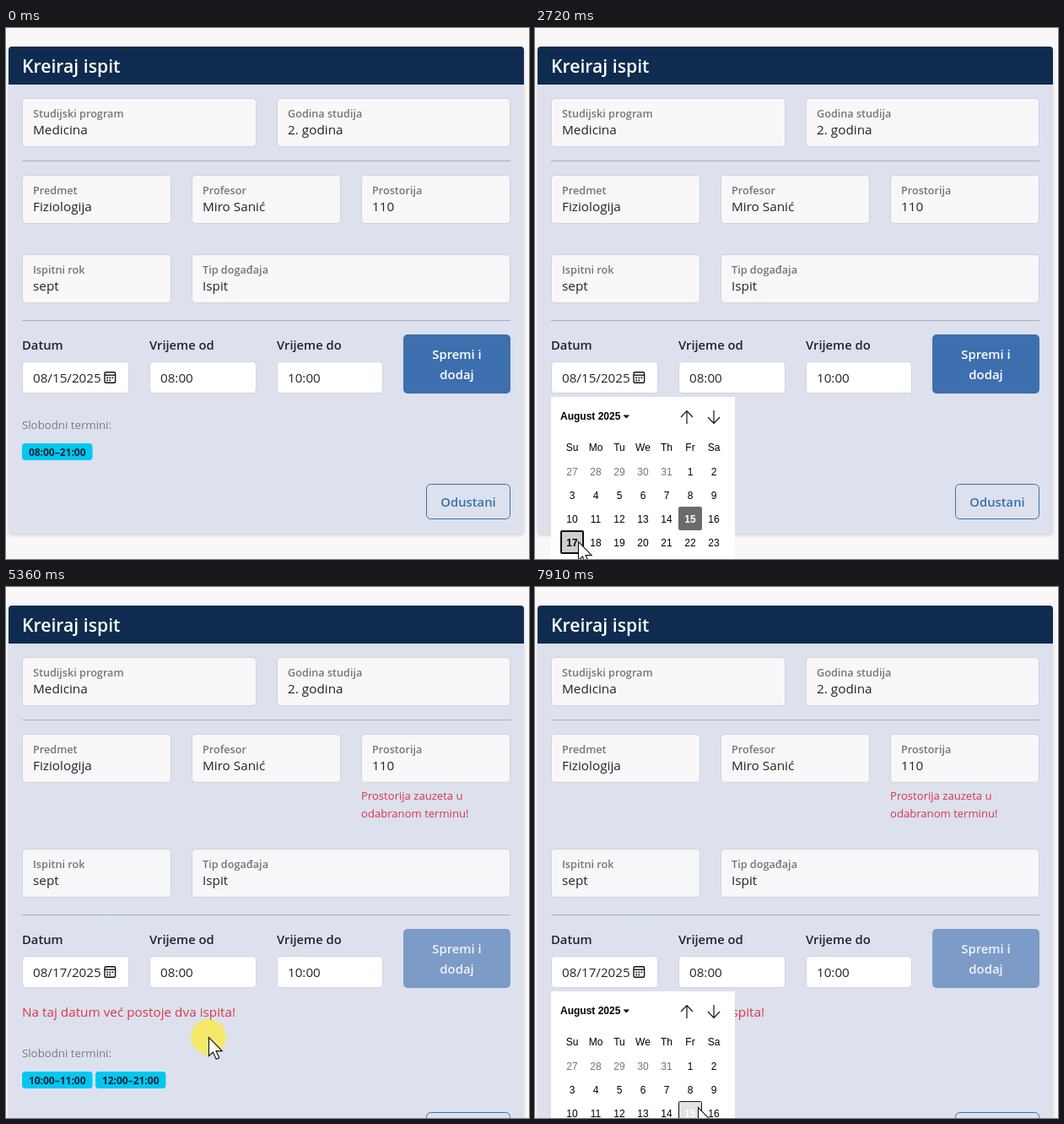
These frames come from a looping animation (620 by 629 pixels, 8 s). An HTML page:

```html
<!DOCTYPE html>
<html lang="hr">
<head>
<meta charset="utf-8">
<title>Kreiraj ispit</title>
<style>
  html, body { margin: 0; width: 100%; height: 100%; overflow: hidden; background: #f9f7f8; }
  svg { display: block; width: 620px; height: 629px; font-family: "Open Sans", "Noto Sans", sans-serif; }
  .picker { font-family: "Liberation Sans", Arial, sans-serif; font-size: 12px; }
  text { white-space: pre; }
</style>
</head>
<body>
<svg id="stage" viewBox="0 0 620 629"></svg>
<script>
const LOOP = 8000;
const INK = '#212529', BLUE = '#3d6fae', RED = '#dc3545';
const stage = document.getElementById('stage');

function add(parent, tag, attrs = {}, content) {
  const node = document.createElementNS('http://www.w3.org/2000/svg', tag);
  set(node, attrs);
  if (content !== undefined) node.textContent = content;
  parent.append(node);
  return node;
}
function set(node, attrs) {
  for (const key in attrs) node.setAttribute(key, attrs[key]);
}
function show(node, on) {
  node.setAttribute('visibility', on ? 'visible' : 'hidden');
}
function write(parent, x, y, size, content, fill = INK, weight = 400, anchor = 'start') {
  return add(parent, 'text', { x, y, 'font-size': size, fill, 'font-weight': weight, 'text-anchor': anchor }, content);
}
function box(parent, x, y, right, bottom, fill, stroke = 'none', rx = 4) {
  return add(parent, 'rect', { x: x + .5, y: y + .5, width: right - x - 1, height: bottom - y - 1, rx, fill, stroke });
}
function field(parent, x, right, y, label, value) {
  const frame = box(parent, x, y, right, y + 58, '#f9f7f8', '#cfd3df');
  write(parent, x + 13, y + 23, 12.65, label, '#757679', 600);
  write(parent, x + 13, y + 43, 15.3, value);
  return frame;
}
function divider(parent, y) {
  add(parent, 'rect', { x: 19, y: y - .5, width: 579, height: 1, fill: '#a9afbc' });
}
function timeInput(parent, x, right, label, value) {
  write(parent, x, 381, 14.75, label, INK, 600);
  box(parent, x, 395, right, 433, '#fff', '#d0d5e0');
  return write(parent, x + 13, 420, 15.2, value);
}
function badge(parent, x) {
  const g = add(parent, 'g');
  add(g, 'rect', { x, y: 492, width: 83.5, height: 20, rx: 4, fill: '#00c8f0' });
  g.label = write(g, x + 41.7, 507, 12, '', '#10243a', 700, 'middle');
  return g;
}

// Card
const defs = add(stage, 'defs');
const blur = add(defs, 'filter', { id: 'blur', x: '-5%', y: '-5%', width: '110%', height: '110%' });
add(blur, 'feGaussianBlur', { stdDeviation: 2 });
add(stage, 'rect', { width: 620, height: 629, fill: '#f9f7f8' });
const shadow = add(stage, 'rect', { x: 3, y: 24, width: 611, rx: 4, fill: '#000', opacity: .15, filter: 'url(#blur)' });
const card = add(stage, 'rect', { x: 3, y: 22, width: 611, rx: 4, fill: '#dce1ed' });
add(stage, 'path', { d: 'M3 67V26a4 4 0 0 1 4-4H610a4 4 0 0 1 4 4V67Z', fill: '#0f2b4f' });
write(stage, 19, 53, 21.2, 'Kreiraj ispit', '#fff', 600);

field(stage, 19, 297, 83, 'Studijski program', 'Medicina');
field(stage, 321, 598, 83, 'Godina studija', '2. godina');
divider(stage, 157.5);
field(stage, 19, 196, 174, 'Predmet', 'Fiziologija');
field(stage, 220, 397, 174, 'Profesor', 'Miro Sanić');
field(stage, 421, 598, 174, 'Prostorija', '110');

const errors = add(stage, 'g');
write(errors, 421, 252, 13.1, 'Prostorija zauzeta u', RED);
write(errors, 421, 273, 13.1, 'odabranom terminu!', RED);
const warning = 'Na taj datum već postoje dva ispita!';
const warningText = write(errors, 19, 509, 15.3, warning, RED);

// Text selection on the warning
const clip = add(add(defs, 'clipPath', { id: 'selected' }), 'rect', { y: 491, height: 24 });
const selection = add(stage, 'g', { 'clip-path': 'url(#selected)' });
add(selection, 'rect', { x: 19, y: 491, width: 300, height: 24, fill: '#2d57c8' });
write(selection, 19, 509, 15.3, warning, '#fff');

// Part that moves down when the errors appear
const lower = add(stage, 'g');
const lowerFields = [
  field(lower, 19, 196, 268, 'Ispitni rok', 'sept'),
  field(lower, 220, 598, 268, 'Tip događaja', 'Ispit')
];
divider(lower, 346.5);
const dateText = timeInput(lower, 19, 146, 'Datum', '');
timeInput(lower, 170, 297, 'Vrijeme od', '08:00');
timeInput(lower, 321, 447, 'Vrijeme do', '10:00');
add(lower, 'rect', { x: 117, y: 407.7, width: 12.6, height: 12.6, rx: 1.5, fill: 'none', stroke: '#111', 'stroke-width': 1.4 });
add(lower, 'path', { d: 'M117 411.2H129.6', stroke: '#111', 'stroke-width': 1.4 });
add(lower, 'path', { d: 'M119.3 414.4H128M119.3 417.4H125', stroke: '#111', 'stroke-width': 1.7, 'stroke-dasharray': '1.8 1.3' });
const save = add(lower, 'g');
add(save, 'rect', { x: 471, y: 363, width: 127, height: 70, rx: 5, fill: BLUE });
write(save, 534.5, 392, 14.9, 'Spremi i', '#fff', 600, 'middle');
write(save, 534.5, 416, 14.9, 'dodaj', '#fff', 600, 'middle');

const footer = add(stage, 'g');
write(footer, 19, 475, 13.25, 'Slobodni termini:', '#757b84');
const firstSlot = badge(footer, 19), secondSlot = badge(footer, 106);
secondSlot.label.textContent = '12:00–21:00';
box(footer, 498, 540, 598, 582, 'none', BLUE, 5);
write(footer, 548, 567, 14.8, 'Odustani', BLUE, 600, 'middle');

const afterglow = add(stage, 'path', { d: 'M110.5 395A21 21 0 0 1 139.5 395Z', fill: '#d9e6e9' });

// Date picker
const picker = add(stage, 'g', { class: 'picker' });
add(picker, 'rect', { x: 19, y: 437, width: 218, height: 260, fill: '#fff' });
write(picker, 30, 464, 12, 'August 2025', '#000', 700);
add(picker, 'path', { d: 'M104.5 458.5h7.5l-3.75 4Z' });
add(picker, 'path', {
  d: 'M180 469V454M173 461L180 453.7L187 461M212 453V468M205 461L212 468.3L219 461',
  fill: 'none', stroke: '#111', 'stroke-width': 1.2
});
['Su', 'Mo', 'Tu', 'We', 'Th', 'Fr', 'Sa'].forEach((name, i) =>
  write(picker, 44 + 28 * i, 501, 12, name, '#000', 400, 'middle'));
const days = Array.from({ length: 42 }, (_, i) => {
  const x = 30 + 28 * (i % 7), y = 511 + 28 * Math.floor(i / 7);
  const day = i - 4, inMonth = day > 0 && day <= 31;
  const cell = add(picker, 'rect', { x, y, width: 28, height: 28 });
  const label = write(picker, x + 14, y + 19, 12, day < 1 ? day + 31 : inMonth ? day : day - 31, '#000', 400, 'middle');
  return { x, y, day, inMonth, cell, label };
});

// Pointer
const glow = add(stage, 'circle', { r: 21, fill: '#ffee38', opacity: .72 });
const arrow = add(stage, 'path', {
  d: 'M.5 .5V22.5L5.4 18L9.2 26.3L12.8 24.7L9 16.6H16.2Z', fill: '#fff', stroke: '#111', 'stroke-width': 1.1
});
const beam = add(stage, 'path', {
  d: 'M-6.5-11.5H-2Q0-11.5 0-9.5Q0-11.5 2-11.5H6.5M0-10V11M-6.5 12.5H-2Q0 12.5 0 10.5Q0 12.5 2 12.5H6.5',
  fill: 'none', stroke: '#333', 'stroke-width': 1.8
});

// Keys: time, x, y
const pointerPath = [
  [160, 334, 550], [480, 225, 505], [740, 64, 445], [900, 95, 424], [1150, 125, 411], [1650, 125, 411],
  [1980, 160, 510], [2240, 110, 570], [2470, 60, 604], [2640, 51, 608], [2800, 51, 608],
  [2880, 191, 552], [3200, 190, 541], [3640, 255, 512], [3900, 291, 502], [4220, 291, 503],
  [4300, 205, 510], [4390, 99, 499], [4550, 21, 500], [4870, 20, 498], [5040, 20, 498],
  [5360, 240, 533], [5950, 240, 533], [6150, 352, 580], [6430, 134, 463], [6590, 139, 468],
  [6840, 139, 468], [7200, 160, 540], [7580, 202, 614], [7740, 200, 616], [7830, 200, 616], [7910, 193, 616]
];
const selectionPath = [[4220, 272], [4390, 116], [4550, 19]];

function track(keys, t) {
  if (t <= keys[0][0]) return keys[0].slice(1);
  const next = keys.findIndex(key => key[0] > t);
  if (next < 0) return keys[keys.length - 1].slice(1);
  const a = keys[next - 1], b = keys[next];
  const k = (t - a[0]) / (b[0] - a[0]);
  return a.slice(1).map((value, i) => value + (b[i + 1] - value) * k);
}
const within = (t, from, to) => t >= from && t < to;

function drawPicker(t, x, y, second) {
  const offset = second ? 42 : 0;
  const pressed = second ? t >= 7900 : t >= 2640;
  picker.setAttribute('transform', `translate(0 ${offset})`);
  for (const d of days) {
    const hover = within(x, d.x, d.x + 28) && within(y - offset, d.y, d.y + 28);
    const chosen = d.day === (second ? 17 : 15);
    const held = hover && pressed;
    const line = second ? 1 : 2;
    set(d.cell, {
      x: d.x + line / 2, y: d.y + line / 2, width: 28 - line, height: 28 - line,
      fill: held ? (second ? '#e2e2e2' : '#cecece') : chosen ? '#6b6b6b' : hover ? '#e8e8e8' : 'none',
      stroke: held ? '#111' : chosen ? '#6b6b6b' : 'none', 'stroke-width': line, rx: 1
    });
    set(d.label, {
      fill: chosen || (held && second) ? '#fff' : d.inMonth ? '#000' : '#74746c',
      'font-weight': chosen || held ? 700 : 400
    });
  }
}

function render(t) {
  const [x, y] = track(pointerPath, t);
  const changed = t >= 2800, busy = t >= 2880;
  const firstOpen = within(t, 1320, 2800), secondOpen = t >= 6840;

  for (const node of [shadow, card]) node.setAttribute('height', busy ? 659 : 577);
  show(errors, busy);
  lower.setAttribute('transform', `translate(0 ${busy ? 42 : 0})`);
  footer.setAttribute('transform', `translate(0 ${busy ? 82 : 0})`);
  lowerFields.forEach(node => node.setAttribute('fill', busy ? '#f6f7f8' : '#f9f7f8'));
  save.setAttribute('opacity', busy ? .6 : 1);
  dateText.textContent = changed ? '08/17/2025' : '08/15/2025';
  firstSlot.label.textContent = busy ? '10:00–11:00' : '08:00–21:00';
  show(secondSlot, busy);
  show(afterglow, t >= 1320);

  const [start] = track(selectionPath, t);
  const end = 19 + warningText.getComputedTextLength();
  set(clip, { x: start, width: Math.max(0, end - start) });
  show(selection, within(t, 4220, 5360));

  show(picker, firstOpen || secondOpen);
  if (firstOpen || secondOpen) drawPicker(t, x, y, secondOpen);

  const onText = within(t, 3640, 5200);
  for (const node of [arrow, beam]) node.setAttribute('transform', `translate(${x} ${y})`);
  set(glow, { cx: onText ? x - 1.5 : x, cy: y });
  show(arrow, t >= 160 && !onText);
  show(beam, onText);
  show(glow, within(t, 1150, 1320) || within(t, 3900, 5040) || within(t, 5360, 5440) || within(t, 6590, 6840));
}

const began = performance.now();
function tick() {
  render((performance.now() - began) % LOOP);
  requestAnimationFrame(tick);
}
tick();
</script>
</body>
</html>
```
